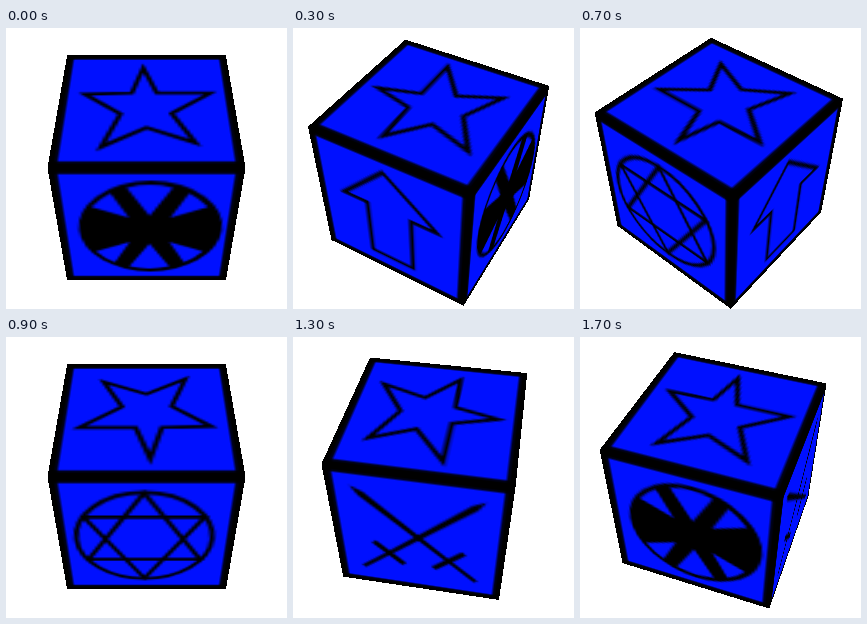
Write an HTML page with a canvas that moves like this. It is 281 by 281 pixels and loops after 1800 ms.

```html
<!DOCTYPE html>
<html lang="en">
<head>
<meta charset="utf-8">
<title>Rotating cube</title>
<style>
html, body { margin: 0; width: 100%; height: 100%; overflow: hidden; background: #fff; }
canvas { display: block; }
</style>
</head>
<body>
<canvas id="stage" width="281" height="281"></canvas>
<script>
const SIZE = 281, TEX = 64;
const FOCAL = 567, DISTANCE = 7.14, CX = 140.5, CY = 139.8;
const STEPS = 18, STEP_MS = 100;
const K = Math.SQRT1_2; // sine and cosine of the 45 degree camera pitch
const GREEN = 16, BLUE = 255;
const rad = deg => deg * Math.PI / 180;

// Each face is drawn in coordinates from -1 to 1 with y pointing up.
function makeTexture(draw) {
  const canvas = document.createElement('canvas');
  canvas.width = canvas.height = TEX;
  const g = canvas.getContext('2d', { willReadFrequently: true });
  g.setTransform(TEX / 2, 0, 0, -TEX / 2, TEX / 2, TEX / 2);
  g.fillStyle = '#00f';
  g.fillRect(-1, -1, 2, 2);
  g.lineWidth = 0.18;
  g.strokeRect(-1, -1, 2, 2);
  g.lineWidth = 0.055;
  g.fillStyle = '#000';
  draw(g);
  const data = g.getImageData(0, 0, TEX, TEX).data;
  return Float32Array.from({ length: TEX * TEX }, (_, i) => data[i * 4 + 2] / 255);
}

function polygon(g, points) {
  g.beginPath();
  points.forEach(([x, y]) => g.lineTo(x, y));
  g.closePath();
}

function outline(g, points) {
  polygon(g, points);
  g.stroke();
}

function disc(g, x, y, r) {
  g.beginPath();
  g.arc(x, y, r, 0, 2 * Math.PI);
}

function star(g) {
  outline(g, [
    [-0.04, 0.73], [0.12, 0.23], [0.745, 0.23], [0.28, -0.14], [0.52, -0.63],
    [0, -0.38], [-0.475, -0.69], [-0.29, -0.15], [-0.72, 0.21], [-0.17, 0.23]
  ]);
}

function wheel(g) {
  disc(g, 0.045, 0, 0.81);
  g.fill();
  g.translate(0.035, 0);
  g.fillStyle = '#00f';
  const wedge = (middle, spread, apex) => {
    const a = rad(middle), s = rad(spread);
    g.beginPath();
    g.moveTo(apex * Math.cos(a), apex * Math.sin(a));
    g.arc(0, 0, 0.745, a - s, a + s);
    g.fill();
  };
  for (const side of [1, -1]) {
    wedge(90 * side, 19, 0.25);
    wedge(44 * side, 12, 0.32);
    wedge(136 * side, 12, 0.32);
  }
}

function hexagram(g) {
  const cx = -0.025, r = 0.76;
  disc(g, cx, 0, 0.77);
  g.stroke();
  for (const start of [90, 270]) {
    outline(g, [0, 120, 240].map(a => [
      cx + r * Math.cos(rad(start + a)), r * Math.sin(rad(start + a))
    ]));
  }
}

function arrow(g) {
  outline(g, [
    [-0.05, 0.77], [0.63, 0.16], [0.29, 0.16], [0.29, -0.73],
    [-0.3, -0.73], [-0.3, 0.16], [-0.63, 0.16]
  ]);
}

function swords(g) {
  for (const angle of [45, 135]) {
    g.save();
    g.rotate(rad(angle));
    polygon(g, [[1.04, 0], [0.88, 0.045], [-0.5, 0.03], [-0.5, -0.03], [0.88, -0.045]]);
    g.fill();
    g.fillRect(-0.54, -0.25, 0.075, 0.5);
    g.fillRect(-0.98, -0.028, 0.5, 0.056);
    g.restore();
  }
}

const topFace = makeTexture(star);
const sides = [wheel, swords, hexagram, arrow].map(makeTexture);

function sample(texture, u, v) {
  const clamp = n => Math.min(TEX - 1, Math.max(0, n));
  const x = clamp((u + 1) * TEX / 2 - 0.5), y = clamp((1 - v) * TEX / 2 - 0.5);
  const x0 = Math.floor(x), y0 = Math.floor(y);
  const x1 = Math.min(x0 + 1, TEX - 1), y1 = Math.min(y0 + 1, TEX - 1);
  const fx = x - x0, fy = y - y0;
  const row = r => texture[r * TEX + x0] * (1 - fx) + texture[r * TEX + x1] * fx;
  return row(y0) * (1 - fy) + row(y1) * fy;
}

const inside = (a, b) => Math.abs(a) <= 1 && Math.abs(b) <= 1;

// Light value where the ray through a screen point meets the cube, or -1.
function trace(rx, ry, turn, faces) {
  const eye = K * DISTANCE, dy = K * (ry - 1), dz = -K * (ry + 1);
  let s = (1 - eye) / dy;
  let x = rx * s, z = eye + dz * s;
  const u = x * turn.cos - z * turn.sin, v = -(x * turn.sin + z * turn.cos);
  if (inside(u, v)) return sample(topFace, u, v);

  for (const { cos, sin, texture } of faces) {
    s = (1 - eye * cos) / (rx * sin + dz * cos);
    x = rx * s;
    z = eye + dz * s;
    const across = x * cos - z * sin, up = eye + dy * s;
    if (s > 0 && inside(across, up)) return sample(texture, across, up);
  }
  return -1;
}

const ctx = document.getElementById('stage').getContext('2d');
const image = ctx.createImageData(SIZE, SIZE);

function render(step) {
  const angle = step / STEPS * 2 * Math.PI;
  const direction = a => ({ cos: Math.cos(a), sin: Math.sin(a) });
  const turn = direction(angle);
  const faces = sides
    .map((texture, i) => ({ ...direction(angle + i * Math.PI / 2), texture }))
    .filter(face => face.cos * K * DISTANCE > 1);

  for (let y = 0, i = 0; y < SIZE; y++) {
    for (let x = 0; x < SIZE; x++, i += 4) {
      const light = trace((x + 0.5 - CX) / FOCAL, (CY - y - 0.5) / FOCAL, turn, faces);
      const empty = light < 0;
      image.data[i] = empty ? 255 : 0;
      image.data[i + 1] = empty ? 255 : GREEN * light;
      image.data[i + 2] = empty ? 255 : BLUE * light;
      image.data[i + 3] = 255;
    }
  }
  ctx.putImageData(image, 0, 0);
}

let shown = -1;
const start = performance.now();

function tick() {
  const step = Math.floor((performance.now() - start) / STEP_MS) % STEPS;
  if (step !== shown) render(shown = step);
  requestAnimationFrame(tick);
}
tick();
</script>
</body>
</html>
```
